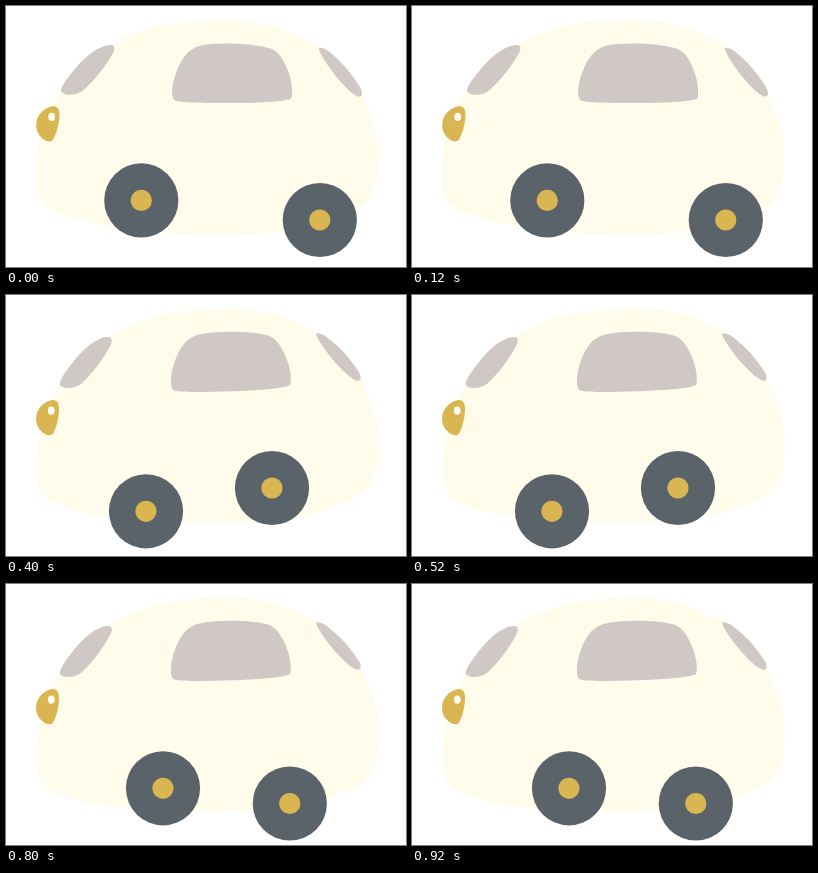
An HTML page with a canvas for the animation above (1 s loop, 400x261 px).

```html
<!DOCTYPE html>
<html lang="en">
<head>
<meta charset="utf-8">
<title>Wobbly car</title>
<style>
html, body { margin: 0; width: 100%; height: 100%; overflow: hidden; background: #fff; }
canvas { display: block; width: 100vw; height: 100vh; }
</style>
</head>
<body>
<canvas id="stage"></canvas>
<script>
const W = 400, H = 261, STEP = 200;
const canvas = document.getElementById('stage');
const ctx = canvas.getContext('2d');

const CREAM = '#fffcec', GLASS = '#d0c8c4', TYRE = '#5a636a', GOLD = '#d9b652';

const body = new Path2D(`M29.5 172 C29.5 160 31 143 36 127 C41 109 48 94 57 82
  C70 64 87 49 107 38 C137 19 180 14 222 14 C258 14 290 25 315 42
  C333 55 347 71 356 89 C366 108 372.5 130 372.5 150 C372.5 166 370 185 361 196
  C346 214 306 224 270 226.5 C244 228.5 216 228.5 188 228
  C150 227 110 222 78 214.5 C58 210 41 204 34.5 195 C30.5 189 29.5 181 29.5 172Z`);
const windows = new Path2D(`M55.5 86 C53 82 63 70 71 60.5 C81 49 93 40 103 39
  C109 38.5 109.5 42 107 47 C100 60 88 75 77 84.5 C71 89.5 60 90.5 55.5 86Z
  M168 94 C165 90 165.5 77 171 64.5 C175.5 53 182 43 194 39.7 C211 36 248 37 266 43
  C275 47 281 60 284.3 72 C286.3 80 287 90 285 92.5 C279 96 248 97 226 97
  C202 97 173 97 168 94Z
  M313 44 C311.5 40 318 42 323 45.5 C336 56 347 69 355 83 C357 88 356 91 352 90.5
  C346 88 340 82 334 75 C326 66 317 53 313 44Z`);
const lamp = new Path2D(`M47 100.3 C51 100 53.5 103 53.5 108 C53.5 117 50.5 128 47 133.5
  C45 136.5 40.5 136 36.5 132.5 C32 128.5 30 124 30.2 118.5 C30.5 108.5 39 101 47 100.3Z`);

// Wheel centres at each pose, and the body tilt that goes with them
const front = [[135.3, 194.4], [114.4, 209], [140, 216.3], [165.5, 218.5], [157, 204.3]];
const rear = [[313.8, 214], [287.8, 198.4], [266, 193], [249.6, 210], [283.8, 219.5]];
const tilt = [0, 1, 2, 3, 2];

function disc(x, y, rx, ry, color) {
  ctx.fillStyle = color;
  ctx.beginPath();
  ctx.ellipse(x, y, rx, ry, 0, 0, Math.PI * 2);
  ctx.fill();
}

function shape(path, color) {
  ctx.fillStyle = color;
  ctx.fill(path);
}

function wheel([x, y]) {
  disc(x, y, 37.1, 37.1, TYRE);
  disc(x, y, 10.6, 10.6, GOLD);
}

function drawCar(pose) {
  ctx.save();
  ctx.translate(200, 127);
  ctx.rotate(-tilt[pose] * 0.0155);
  ctx.translate(-200, -127);
  shape(body, CREAM);
  shape(windows, GLASS);
  shape(lamp, GOLD);
  disc(45.7, 110.9, 3.4, 4.1, '#fffdf4');
  ctx.restore();
  wheel(front[pose]);
  wheel(rear[pose]);
}

function resize() {
  const dpr = window.devicePixelRatio || 1;
  canvas.width = Math.round(innerWidth * dpr);
  canvas.height = Math.round(innerHeight * dpr);
}

function render() {
  const pose = Math.floor(performance.now() / STEP) % tilt.length;
  ctx.setTransform(canvas.width / W, 0, 0, canvas.height / H, 0, 0);
  ctx.fillStyle = '#fff';
  ctx.fillRect(0, 0, W, H);
  drawCar(pose);
  requestAnimationFrame(render);
}

addEventListener('resize', resize);
resize();
render();
</script>
</body>
</html>
```
